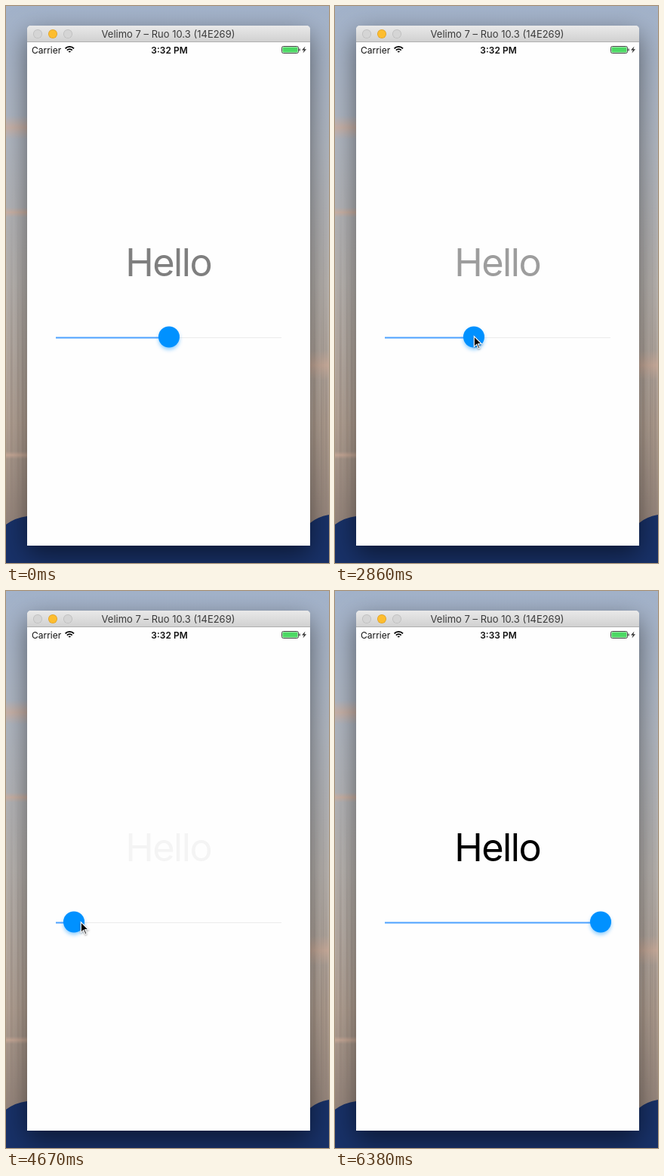
Animation, 428 px wide and 738 px high, one loop 7380 ms. Source, as an HTML page with a canvas:

```html
<!DOCTYPE html>
<html lang="en">
<head>
<meta charset="utf-8">
<title>Opacity slider</title>
<style>
html, body { margin: 0; width: 100%; height: 100%; overflow: hidden; }
canvas { display: block; width: 428px; height: 738px; }
</style>
</head>
<body>
<canvas id="stage"></canvas>
<script>
const W = 428, H = 738, LOOP = 7380;
const FONT = 'Inter, "Liberation Sans", sans-serif';
const scale = window.devicePixelRatio || 1;

function setup(canvas) {
  canvas.width = W * scale;
  canvas.height = H * scale;
  const c = canvas.getContext('2d');
  c.scale(scale, scale);
  return c;
}

const ctx = setup(document.getElementById('stage'));
const backdrop = document.createElement('canvas');
const back = setup(backdrop);

// The pointer eases between its turning points; the knob trails it while pressed.
const PRESS = 1590, RELEASE = 5850, LAG = 36;
const MIN = 80, MAX = 352, RAIL = 438.5;
const turns = [
  { t: 800, x: -12, y: 570 },
  { t: 1400, x: 197, y: 439 },
  { t: PRESS, x: 216, y: 438 },
  { t: 2400, x: 94, y: 440 },
  { t: 2830, x: 184, y: 437 },
  { t: 3060, x: 184, y: 437 },
  { t: 3480, x: 345, y: 433 },
  { t: 3660, x: 334, y: 433 },
  { t: 3720, x: 334, y: 433 },
  { t: 4235, x: 92, y: 436 },
  { t: 4540, x: 80, y: 438 },
  { t: 5200, x: 285, y: 438 },
  { t: RELEASE, x: 369, y: 443 },
  { t: 6380, x: -12, y: 384 }
];

const clamp = (v, lo, hi) => Math.min(hi, Math.max(lo, v));
const ease = u => (1 - Math.cos(Math.PI * u)) / 2;

function pointer(t) {
  const i = clamp(turns.findIndex(p => p.t > t), 1, turns.length - 1);
  const a = turns[i - 1], b = turns[i];
  const u = ease(clamp((t - a.t) / (b.t - a.t), 0, 1));
  return { x: a.x + (b.x - a.x) * u, y: a.y + (b.y - a.y) * u };
}

function knobX(t) {
  return clamp(pointer(clamp(t - LAG, PRESS, RELEASE)).x, MIN, MAX);
}

function random(seed) {
  return () => (seed = seed * 16807 % 2147483647) / 2147483647;
}

function text(c, str, x, y, font, color, align = 'left') {
  c.font = `${font} ${FONT}`;
  c.fillStyle = color;
  c.textAlign = align;
  c.fillText(str, x, y);
}

function disc(c, x, y, r, fill) {
  c.beginPath();
  c.arc(x, y, r, 0, Math.PI * 2);
  c.fillStyle = fill;
  c.fill();
}

function fade(c, y0, y1, ...colors) {
  const g = c.createLinearGradient(0, y0, 0, y1);
  colors.forEach((color, i) => g.addColorStop(i / (colors.length - 1), color));
  return g;
}

function drawWallpaper(c) {
  c.fillStyle = fade(c, 0, H, '#a2b2ca', '#b0b6c0', '#b6b1ad', '#b09e90', '#8c7c74');
  c.fillRect(0, 0, W, H);

  const next = random(11);
  for (let x = 0; x < W; x += 3) {
    const tone = next() < .5 ? '#ffffff' : '#403c40';
    c.fillStyle = fade(c, 120 + 300 * next(), 690, tone + '00', tone + '16', tone + '00');
    c.fillRect(x, 0, 1 + 3 * next(), 690);
  }

  const cloud = (x, y, h) => {
    c.fillStyle = fade(c, y, y + h, '#d4b09c00', '#d4b09cb0', '#d4b09c00');
    c.fillRect(x, y, 28, h);
  };
  cloud(0, 145, 32);
  cloud(0, 267, 13);
  cloud(0, 590, 10);
  cloud(403, 456, 40);

  c.fillStyle = '#183168';
  c.beginPath();
  c.moveTo(0, H);
  c.lineTo(0, 687);
  c.quadraticCurveTo(12, 678, 28, 676);
  c.lineTo(403, 685);
  c.quadraticCurveTo(412, 677, W, 674);
  c.lineTo(W, H);
  c.fill();
}

function drawWindow(c) {
  c.save();
  c.shadowColor = 'rgba(0,0,0,.5)';
  c.shadowBlur = 34 * scale;
  c.shadowOffsetY = 12 * scale;
  c.fillStyle = '#fefefe';
  c.beginPath();
  c.roundRect(28, 26, 375, 689, [5, 5, 0, 0]);
  c.fill();
  c.restore();

  c.fillStyle = fade(c, 26, 48, '#e9e9e9', '#d0d0d0');
  c.beginPath();
  c.roundRect(28, 26, 375, 22, [5, 5, 0, 0]);
  c.fill();
  c.fillStyle = '#b0b0b0';
  c.fillRect(28, 47, 375, 1);

  for (let i = 0; i < 3; i++) {
    disc(c, 42 + 20 * i, 37, 6, i === 1 ? '#dfa023' : '#bdbdbd');
    disc(c, 42 + 20 * i, 37, 5.2, i === 1 ? '#fdbd2f' : '#d5d5d5');
  }
  text(c, 'Velimo 7 – Ruo 10.3 (14E269)', 215, 42, '13px', '#3b3b3b', 'center');
}

function drawStatus(c) {
  text(c, 'Carrier', 34, 62.5, '12px', '#111');

  c.strokeStyle = '#000';
  c.lineWidth = 1.8;
  for (let r = 1.5; r < 9; r += 3.3) {
    c.beginPath();
    c.arc(84.3, 62, r, -Math.PI * .75, -Math.PI * .25);
    c.stroke();
  }

  c.lineWidth = 1;
  c.strokeStyle = '#444';
  c.beginPath();
  c.roundRect(365.5, 53.5, 22, 9, 2);
  c.stroke();
  c.fillStyle = '#4cd964';
  c.fillRect(366.5, 54.5, 20, 7);
  c.fillStyle = '#333';
  c.fillRect(388.5, 56.5, 1.2, 3);
  c.fill(new Path2D('M396.5 53.5 L392 58.6 H394.8 L393.5 62.5 L398 57.2 H395.3 Z'));
}

function drawHello(alpha) {
  const shade = Math.round(254 * (1 - alpha));
  ctx.letterSpacing = '-1.6px';
  text(ctx, 'Hello', 215.2, 357.5, '50.5px', `rgb(${shade},${shade},${shade})`, 'center');
  ctx.letterSpacing = '0px';
}

function drawSlider(x) {
  ctx.fillStyle = '#ececec';
  ctx.fillRect(x, 439, 365 - x, 1);
  ctx.fillStyle = '#4da1ff';
  ctx.fillRect(66, RAIL, x - 66, 2);
  ctx.save();
  ctx.shadowColor = 'rgba(0,145,255,.42)';
  ctx.shadowBlur = 5 * scale;
  ctx.shadowOffsetY = 3 * scale;
  disc(ctx, x, RAIL, 14, '#0091ff');
  ctx.restore();
}

const arrow = new Path2D('M.5 1.2 V14 L3.7 11 L6.2 16.5 L7.7 15.8 L5.3 10.5 H9.7 Z');

function drawCursor({ x, y }) {
  ctx.save();
  ctx.translate(Math.round(x), Math.round(y));
  ctx.shadowColor = 'rgba(0,0,0,.4)';
  ctx.shadowBlur = 2.5 * scale;
  ctx.shadowOffsetY = scale;
  ctx.strokeStyle = '#fff';
  ctx.lineWidth = 1.6;
  ctx.stroke(arrow);
  ctx.shadowColor = 'transparent';
  ctx.fillStyle = '#000';
  ctx.fill(arrow);
  ctx.lineWidth = .8;
  ctx.stroke(arrow);
  ctx.restore();
}

function render(t) {
  ctx.drawImage(backdrop, 0, 0, W, H);
  text(ctx, t < 5500 ? '3:32 PM' : '3:33 PM', 216.5, 62.5, '600 12px', '#111', 'center');
  const x = knobX(t);
  drawHello((x - MIN) / (MAX - MIN));
  drawSlider(Math.round(x));
  if (t >= 800 && t < 6380) drawCursor(pointer(t));
}

drawWallpaper(back);
drawWindow(back);
drawStatus(back);

const start = performance.now();
function frame() {
  render((performance.now() - start) % LOOP);
  requestAnimationFrame(frame);
}
render(0);
requestAnimationFrame(frame);
</script>
</body>
</html>
```
